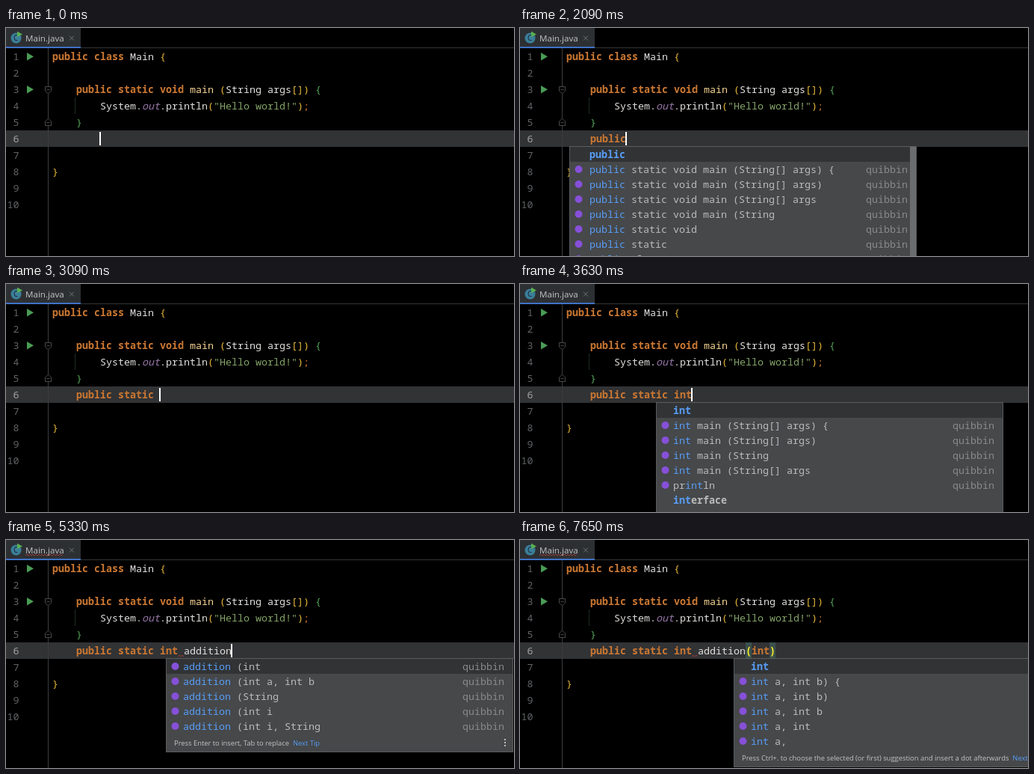
Recreate the animation shown at these times as an HTML page. Size 680x305 px, loop 7.99 s.

```html
<!DOCTYPE html>
<html lang="en">
<head>
<meta charset="utf-8">
<title>Code completion</title>
<style>
  html, body { margin: 0; width: 100%; height: 100%; overflow: hidden; background: #000; }
  svg { display: block; width: 680px; height: 305px; }
  text { white-space: pre; font: 13.333px "Noto Sans Mono", monospace; fill: #e2e0de; }
  .ui { font: 11.6px "Open Sans", sans-serif; fill: #c4c4c4; }
  .hint { font-size: 9.4px; }
  .keyword { fill: #cc7832; font-weight: bold; }
  .semi { fill: #cc7832; }
  .method { fill: #f8d694; }
  .gold { fill: #e8ba36; }
  .green { fill: #54a857; }
  .string { fill: #84a468; }
  .field { fill: #9876aa; font-style: italic; }
  .paired { fill: #ffef28; font-weight: bold; }
  .number { fill: #606366; text-anchor: end; }
  .current { fill: #a4a3a3; }
  .item { fill: #bbb; }
  .bold { font-weight: bold; }
  .match { fill: #589df6; }
  .tail { fill: #8a8a8a; text-anchor: end; }
  .wave { fill: none; stroke: #bc3f3c; stroke-width: .8; }
</style>
</head>
<body>
<svg id="stage" viewBox="0 0 680 305">
  <rect width="100" height="26" fill="#2d3033"/>
  <path d="M0 26.5H680" stroke="#323436"/>
  <rect y="25" width="100" height="2" fill="#3f72c8"/>
  <circle cx="13.5" cy="13.5" r="7" fill="#3b7f9b"/>
  <text class="ui" x="10" y="17.2" style="font-size:10px;fill:#16232a">C</text>
  <path d="M15 4.5L22 8.5L15 12Z" fill="#5bb04f"/>
  <text class="ui" x="26" y="18">Main.java</text>
  <path d="M85 10.5L91 16.5M91 10.5L85 16.5" stroke="#6e7072"/>
  <rect y="137" width="680" height="22" fill="#323335"/>
  <path d="M56.5 27V305" stroke="#3c3d3f"/>
  <path d="M92.5 93V115" stroke="#1c2e1e"/>
  <path d="M28 33L37 38.2L28 43.5ZM28 77L37 82.2L28 87.5Z" fill="#499c54"/>
  <g fill="#000" stroke="#48494b">
    <path d="M52.5 78.5H60.5V84L56.5 88L52.5 84ZM54.5 82.5H58.5"/>
    <path d="M52.5 130.5H60.5V125L56.5 121L52.5 125ZM54.5 126.5H58.5"/>
  </g>
  <g id="code"></g>
  <g id="live"></g>
</svg>
<script>
const LOOP = 7990, CELL = 8, LEFT = 62, INDENT = 4;
const TYPED = 'public static int addition(int';
const KEY_TIMES = [
  1500, 1610, 1710, 1820, 1920, 2090, 2230,
  2430, 2540, 2640, 2740, 2910, 2980, 3090,
  3280, 3420, 3560, 3900,
  4230, 4570, 4680, 4800, 4920, 5030, 5140, 5260,
  6600, 6910, 6980, 7040];
const CARET_OFF = [[130, 630], [6200, 6600], [7650, LOOP]];
const ERROR_TIME = 4330;
const SOURCE = 'quibbin';
const DOT_TIP = 'Press Ctrl+. to choose the selected (or first) suggestion and insert a dot afterwards';
const CARET_TIP = 'Ctrl+Down and Ctrl+Up will move caret down and up in the editor';
const INSERT_TIP = 'Press Enter to insert, Tab to replace';

// A leading * marks a keyword: bold, without icon and source.
const STATIC_ITEMS = ['*static', 'static void main (String[] args) {', 'static void main (String[] args)',
  '*sealed', 'static void main (String[] args', 'static void main (String', 'static void main (String[]', '*strictfp'];
const popups = [
  { from: 1570, to: 2230, shift: 28, tip: INSERT_TIP, items: ['*public', 'public static void main (String[] args) {',
    'public static void main (String[] args)', 'public static void main (String[] args', 'public static void main (String',
    'public static void', 'public static', 'public class'] },
  { from: 2500, to: 2570, shift: 28, tip: INSERT_TIP, items: STATIC_ITEMS },
  { from: 2570, to: 2910, shift: 28, width: 502, tip: INSERT_TIP, items: STATIC_ITEMS.filter(s => s != '*sealed') },
  { from: 2910, to: 3090, shift: 28, width: 502, tip: INSERT_TIP,
    items: STATIC_ITEMS.filter(s => s.includes('static')) },
  { from: 3350, to: 3900, tip: INSERT_TIP, items: ['*int', 'int main (String[] args) {', 'int main (String[] args)',
    'int main (String', 'int main (String[] args', 'println', '*interface'] },
  { from: 4300, to: 4570, tip: CARET_TIP, items: ['args', 'assert', 'abstract', 'static', 'main', 'final'] },
  { from: 4570, to: 4610, tip: CARET_TIP, items: ['args', 'assert', 'abstract', 'static', 'main'] },
  { from: 4610, to: 6600, tip: INSERT_TIP, items: ['addition (int', 'addition (int a, int b', 'addition (String',
    'addition (int i', 'addition (int i, String'] },
  { from: 6950, to: LOOP, tip: DOT_TIP, items: ['*int', 'int a, int b) {', 'int a, int b)', 'int a, int b',
    'int a, int', 'int a,'] }
];

const columnX = column => LEFT + CELL * column;
const baseline = line => 21 + 22 * line;
const during = (t, from, to) => t >= from && t < to;
const span = (style, text) => `<tspan class="${style}">${text}</tspan>`;
const rect = (x, y, w, h, fill) => `<rect x="${x}" y="${y}" width="${w}" height="${h}" fill="${fill}"/>`;
const label = (style, x, y, content) => `<text class="${style}" x="${x}" y="${y}">${content}</text>`;
const codeLine = (line, column, content) => label('', columnX(column), baseline(line), content);
const keywords = text => text.replace(/\b(public|static|class|void|int)\b/g, word => span('keyword', word));

function wave(x, y, width) {
  let path = `M${x} ${y}`;
  for (let i = 1; i <= width / 2; i++) path += `L${x + 2 * i} ${y - i % 2 * 2}`;
  return `<path class="wave" d="${path}"/>`;
}

function staticCode() {
  let out = '';
  for (let n = 1; n <= 10; n++) out += label(n == 6 ? 'number current' : 'number', 17.5, baseline(n), n);
  return out
    + codeLine(1, 0, keywords('public class') + ' Main ' + span('gold', '{'))
    + codeLine(3, 4, keywords('public static void') + span('method', ' main ') + span('gold', '(') + 'String args'
      + span('gold', '[])') + ' ' + span('green', '{'))
    + codeLine(4, 8, 'System.' + span('field', 'out') + '.println' + span('gold', '(')
      + span('string', '"Hello world!"') + span('gold', ')') + span('semi', ';'))
    + codeLine(5, 4, span('green', '}'))
    + codeLine(8, 0, span('gold', '}'));
}

function itemText(text, word) {
  const at = word ? text.indexOf(word) : -1;
  if (at < 0) return text;
  return text.slice(0, at) + span('match', word) + text.slice(at + word.length);
}

function drawPopup({ items, tip, shift = 24, width = 465 }, typed) {
  const wordStart = typed.search(/\w*$/), word = typed.slice(wordStart);
  const wordX = columnX(INDENT + wordStart), x = wordX - shift, right = x + width;
  const footerY = 159 + 20 * items.length;
  let out = rect(x, 158, width, footerY - 133, '#5a5c5e')
    + rect(x + 1, 159, width - 2, footerY - 135, '#46484a')
    + rect(x + 1, 159, width - 2, 20, '#313335');
  items.forEach((item, i) => {
    const y = 174 + 20 * i, isKeyword = item[0] == '*';
    out += label(isKeyword ? 'item bold' : 'item', wordX - 1, y, itemText(item.replace('*', ''), word));
    if (!isKeyword) {
      out += `<circle cx="${x + 12.5}" cy="${y - 5}" r="5" fill="#8650d8"/>`
        + label('tail', right - 12, y, SOURCE);
    }
  });
  if (items.length > 7) out += rect(right - 9, 159, 8, 160, '#6a6c6e');
  out += label('ui hint', x + 11, footerY + 16, tip + span('match', '  Next Tip'));
  for (let i = 0; i < 3; i++) out += rect(right - 12, footerY + 7 + 4 * i, 2, 2, '#bbb');
  return out;
}

function drawLive(t) {
  const typed = TYPED.slice(0, KEY_TIMES.filter(time => time <= t).length);
  const column = INDENT + (t < 800 ? 4 : typed.length);
  const open = typed.indexOf('(');
  let out = '', line = keywords(typed);
  if (open >= 0) {
    out += rect(columnX(INDENT + open), 137, CELL, 22, '#3b514d') + rect(columnX(column), 137, CELL, 22, '#3b514d');
    line = line.replace('(', span('paired', '(')) + span('paired', ')');
  }
  out += codeLine(6, INDENT, line);
  if (t >= ERROR_TIME) out += wave(26, 21, 50) + wave(230, 156, 8);
  if (!CARET_OFF.some(([from, to]) => during(t, from, to))) out += rect(columnX(column) - 1, 139, 2, 18, '#fff');
  const popup = popups.find(({ from, to }) => during(t, from, to));
  return popup ? out + drawPopup(popup, typed) : out;
}

const live = document.getElementById('live');
let shown = '';
function frame() {
  const picture = drawLive(performance.now() % LOOP);
  if (picture != shown) live.innerHTML = shown = picture;
  requestAnimationFrame(frame);
}
document.getElementById('code').innerHTML = staticCode();
frame();
</script>
</body>
</html>
```
